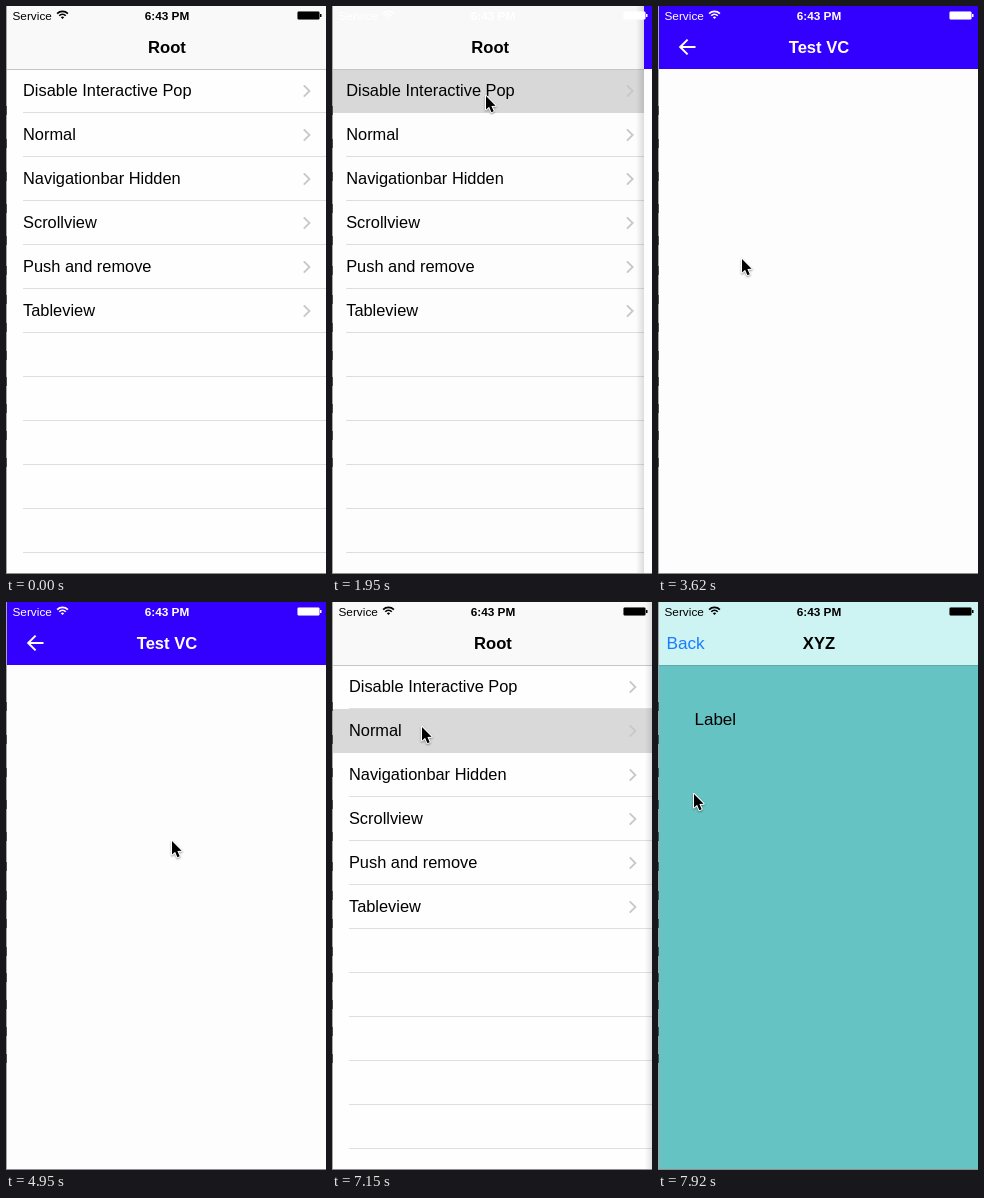
An HTML page with a canvas for the animation above (8000 ms loop, 320 by 568 pixels).

```html
<!DOCTYPE html>
<html lang="en">
<head>
<meta charset="utf-8">
<title>Navigation demo</title>
<style>
html, body { margin: 0; width: 100%; height: 100%; overflow: hidden; background: #fff; }
canvas { display: block; width: 320px; height: 568px; }
</style>
</head>
<body>
<canvas id="stage" width="320" height="568"></canvas>
<script>
const ctx = document.getElementById('stage').getContext('2d');
const LOOP = 8000, STEP = 88, W = 320, H = 568, NAV = 63, ROW = 44;
const PRESS_TEST = 1672, PUSH_TEST = 1921;
const PRESS_BACK = 5808, POP_TEST = 6057;
const PRESS_XYZ = 6952, PUSH_XYZ = 7126;
const FONT = '"Liberation Sans", Arial, sans-serif';
const ROWS = ['Disable Interactive Pop', 'Normal', 'Navigationbar Hidden',
  'Scrollview', 'Push and remove', 'Tableview'];

// Pointer moves: first step, number of steps, destination.
const ENTRY = { x: 251, y: 303 };
const MOVES = [
  [3, 7, 154, 89], [23, 4, 123, 155], [27, 6, 4, 239],
  [34, 5, 157, 262], [39, 6, 10, 241], [49, 5, 184, 249], [55, 1, 166, 238],
  [56, 9, 32, 46], [69, 2, 39, 57], [71, 7, 90, 124], [87, 3, 36, 191]
];

const clamp = v => Math.min(1, Math.max(0, v));
const smooth = v => v * v * (3 - 2 * v);
const easeOut = v => Math.sin(v * Math.PI / 2);
const mix = (a, b, k) => a + (b - a) * k;

// Critically damped settling from 0 to 1.
function spring(t) {
  const u = Math.max(0, t) * 0.0176;
  return u > 9 ? 1 : 1 - (1 + u) * Math.exp(-u);
}

function rect(x, y, w, h, color) {
  ctx.fillStyle = color;
  ctx.fillRect(x, y, w, h);
}

function text(str, x, y, size, color = '#000', weight = 400, align = 'left') {
  ctx.font = `${weight} ${size}px ${FONT}`;
  ctx.fillStyle = color;
  ctx.textAlign = align;
  ctx.fillText(str, x, y);
}

function title(str, color) {
  text(str, W / 2, 47, 16.6, color, 700, 'center');
}

// An angle bracket with its tip at x, y; a negative size points right.
function bracket(x, y, size, color, width) {
  ctx.strokeStyle = color;
  ctx.lineWidth = width;
  ctx.beginPath();
  ctx.moveTo(x + size, y - Math.abs(size));
  ctx.lineTo(x, y);
  ctx.lineTo(x + size, y + Math.abs(size));
  ctx.stroke();
}

function drawRoot(selected, strength) {
  rect(0, 0, W, H, '#fefefe');
  rect(0, 0, W, NAV, '#f9f9f9');
  title('Root', '#000');
  for (let y = NAV + ROW - 1; y < H; y += ROW) rect(16, y, W, 1, '#dedde0');
  rect(0, NAV + selected * ROW, W, ROW, `rgba(217,217,217,${strength})`);
  rect(0, NAV, W, 1, '#c6c6c8');
  ROWS.forEach((label, i) => {
    const y = NAV + (i + 0.5) * ROW;
    text(label, 16, y + 5, 16.4);
    bracket(302.5, y, -5.7, '#c7c7cc', 1.8);
  });
}

function drawTest(pressed) {
  const color = pressed ? 'rgba(255,255,255,0.3)' : '#fff';
  rect(0, 0, W, H, '#fdfdfd');
  rect(0, 0, W, NAV, '#3300ff');
  title('Test VC', '#fff');
  bracket(21.2, 41, 7.4, color, 2);
  rect(21.5, 40, 15, 2, color);
}

function drawXyz() {
  rect(0, 0, W, H, '#66c3c3');
  rect(0, 0, W, NAV, '#cdf3f3');
  rect(0, NAV, W, 1, '#5fa9a9');
  text('Back', 7.5, 47, 17.2, '#1a7cff');
  title('XYZ', '#000');
  text('Label', 35.5, 123, 17);
}

function drawStatus(color) {
  text('Service', 6.5, 13.5, 11.8, color);
  text('6:43 PM', 161, 13.5, 11.8, color, 700, 'center');

  ctx.strokeStyle = color;
  for (const r of [1.2, 4.6, 7.6]) {
    ctx.lineWidth = r < 2 ? 2.4 : 1.7;
    ctx.beginPath();
    ctx.arc(56.5, 13, r, -Math.PI * 0.75, -Math.PI * 0.25);
    ctx.stroke();
  }

  ctx.globalAlpha = 0.55;
  ctx.lineWidth = 1;
  ctx.beginPath();
  ctx.roundRect(291.5, 5.5, 22, 8, 1.5);
  ctx.stroke();
  ctx.globalAlpha = 1;
  rect(292, 6, 21, 7, color);
  rect(314, 8, 1.5, 3, color);
}

// The page on top slides from the right while Root drifts at 30 % of its speed.
function drawPages({ cover, shade, drawTop, selected, strength }) {
  ctx.save();
  ctx.translate(1 - 0.3 * W * cover, 0);
  drawRoot(selected, strength);
  ctx.restore();
  if (!drawTop) return;

  const edge = 1 + Math.round(W * (1 - cover));
  rect(0, 0, edge, H, `rgba(0,0,0,${0.1 * cover})`);
  const shadow = ctx.createLinearGradient(edge - 8, 0, edge, 0);
  shadow.addColorStop(0, 'rgba(0,0,0,0)');
  shadow.addColorStop(1, `rgba(0,0,0,${0.13 * shade})`);
  rect(edge - 8, 0, 8, H, shadow);
  ctx.save();
  ctx.translate(edge, 0);
  drawTop();
  ctx.restore();
}

// A sliver of the window behind: dark specks at irregular heights.
function drawDesktopEdge() {
  rect(0, 0, 1, H, '#a6a6a6');
  for (let i = 0; i < 13; i++) {
    const jitter = 10 * Math.sin(i * 12.9);
    rect(0, Math.round(100 + i * 30 + jitter), 1, 9, '#4c4c4c');
  }
  rect(0, H - 1, W, 1, '#8e8e8e');
}

function drawPointer(t) {
  const step = t / STEP;
  if (step < MOVES[0][0]) return;
  let { x, y } = ENTRY;
  for (const [start, length, toX, toY] of MOVES) {
    const k = easeOut(clamp((step - start) / length));
    x = mix(x, toX, k);
    y = mix(y, toY, k);
  }
  ctx.save();
  ctx.translate(Math.round(x), Math.round(y) + 1);
  ctx.lineJoin = 'round';
  ctx.lineWidth = 2;
  ctx.strokeStyle = '#fff';
  ctx.fillStyle = '#000';
  ctx.shadowColor = 'rgba(0,0,0,0.4)';
  ctx.shadowBlur = 2;
  ctx.shadowOffsetY = 1;
  const shape = new Path2D('M0 0V13.6L3.1 10.8 5.4 16.2 7.7 15.2 5.4 10 9.6 9.8Z');
  ctx.stroke(shape);
  ctx.shadowColor = 'transparent';
  ctx.fill(shape);
  ctx.restore();
}

function sceneAt(t) {
  const scene = { cover: 0, shade: 1, drawTop: null, selected: 0, strength: 0 };
  if (t >= PUSH_XYZ) {
    scene.cover = spring(t - PUSH_XYZ);
    scene.drawTop = drawXyz;
  } else if (t >= PUSH_TEST) {
    scene.cover = spring(t - PUSH_TEST) - spring(t - POP_TEST);
    if (t >= POP_TEST) scene.shade = scene.cover;
    if (scene.cover > 0) scene.drawTop = () => drawTest(t >= PRESS_BACK && t < POP_TEST);
  }
  if (t >= PRESS_XYZ) {
    scene.selected = scene.strength = 1;
  } else if (t >= PRESS_TEST) {
    scene.strength = 1 - smooth(clamp((t - POP_TEST) / 600));
  }
  return scene;
}

function render(now) {
  // The screen refreshes in even steps.
  const t = Math.floor((now % LOOP + 4) / STEP) * STEP;
  drawPages(sceneAt(t));
  drawStatus(t >= PUSH_TEST && t < POP_TEST ? '#fff' : '#000');
  drawDesktopEdge();
  drawPointer(t);
}

function tick() {
  render(performance.now());
  requestAnimationFrame(tick);
}
tick();
</script>
</body>
</html>
```
